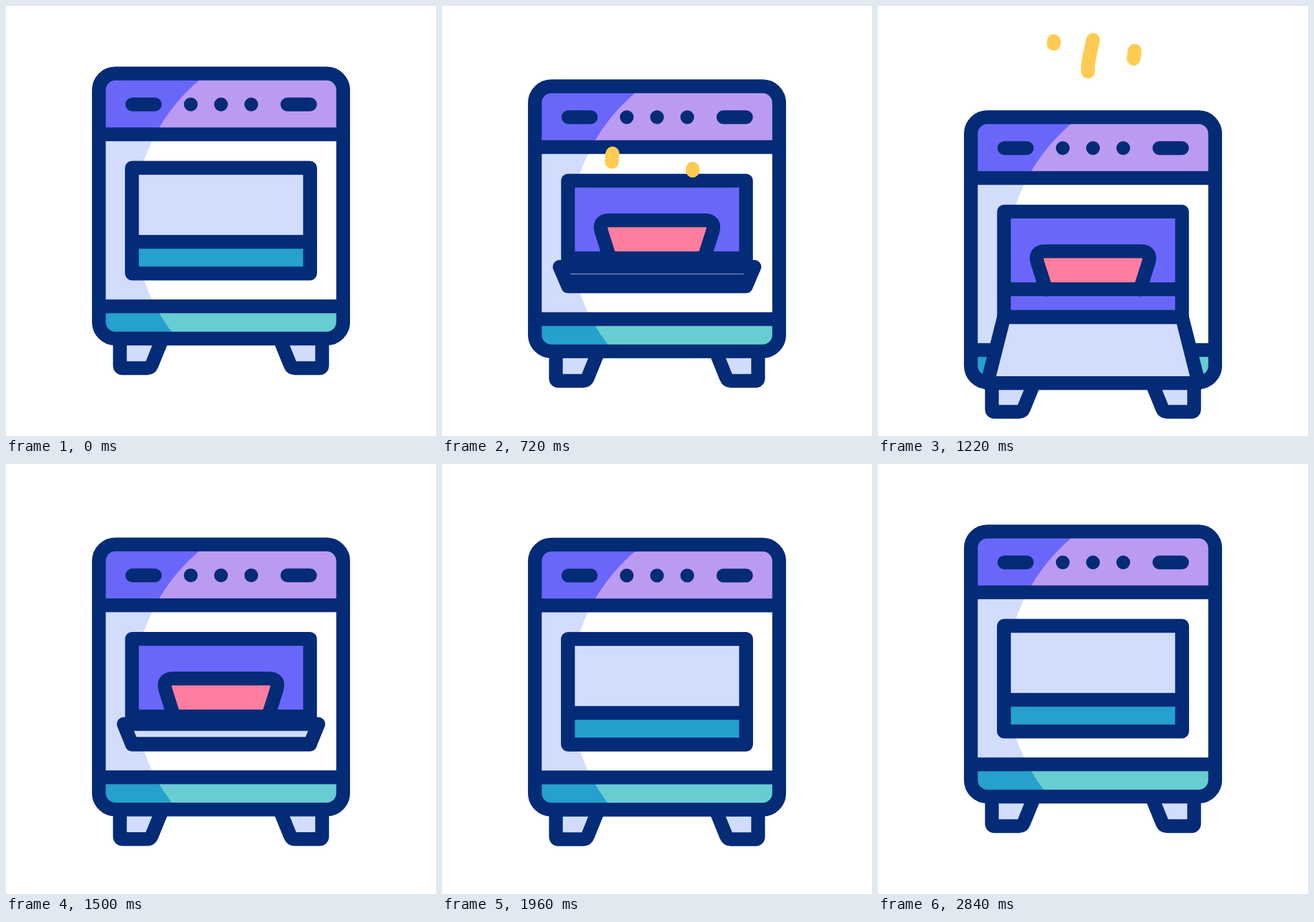
Recreate the animation shown at these times as an HTML page. Size 640 by 640 pixels, loop 2.96 s.

```html
<!DOCTYPE html>
<html lang="en">
<head>
<meta charset="utf-8">
<title>Oven</title>
<style>
  html, body { margin: 0; height: 100%; overflow: hidden; background: #fff; }
  svg { display: block; width: 100vw; height: 100vh; }
  .line { stroke: #042b76; stroke-width: 20.5; stroke-linejoin: round; stroke-linecap: round; }
</style>
</head>
<body>
<svg viewBox="0 0 640 640" fill="none">
  <defs>
    <clipPath id="lit"><circle cx="463" cy="319" r="272.5"/></clipPath>
    <path id="foot" class="line" fill="#d2dcfd" d="M169.5 495V535q0 4 4 4H210q5 0 7-5L232 497"/>
  </defs>
  <g id="oven">
    <use href="#foot"/>
    <use href="#foot" transform="matrix(-1 0 0 1 640 0)"/>
    <path fill="#6a66fa" d="M142 105H498V191H142z"/>
    <path fill="#d2dcfd" d="M142 191H498V447H142z"/>
    <path fill="#26a0cc" d="M142 447H498V490H142z"/>
    <g clip-path="url(#lit)">
      <path fill="#bb9af2" d="M142 105H498V191H142z"/>
      <path fill="#fff" d="M142 191H498V447H142z"/>
      <path fill="#68cdd3" d="M142 447H498V490H142z"/>
    </g>
    <rect class="line" x="138.2" y="100.6" width="363.6" height="394.4" rx="24.5"/>
    <path class="line" d="M140 191H500M140 447H500M188 146.6H221.5M418.8 146.6H452.5M275 146.6h.01M320 146.6h.01M365 146.6h.01"/>
    <path class="line" fill="#6a66fa" d="M187.5 241H452.5V398H187.5z"/>
    <path class="line" fill="#ff7e9f" d="M250 357L237 316Q233 300 249 300H391Q407 300 403 316L390 357"/>
    <path class="line" d="M190 356.5H450"/>
    <path id="pane" fill="#d2dcfd"/>
    <path id="strip" fill="#26a0cc"/>
    <path id="bar" class="line"/>
    <path id="frame" class="line"/>
  </g>
  <path id="steam" stroke="#ffcb52" stroke-width="20.5" stroke-linecap="round" stroke-linejoin="round"/>
</svg>
<script>
const LOOP = 2960, HINGE = 398, DOOR = 157;
const $ = id => document.getElementById(id);
const clamp = v => Math.min(1, Math.max(0, v));
const sine = u => (1 - Math.cos(Math.PI * u)) / 2;

// Keys are [time, value, easing towards this key]
function track(t, keys) {
  let [t0, v0] = keys[0];
  for (const [t1, v1, ease = sine] of keys) {
    if (t < t1) return t <= t0 ? v0 : v0 + (v1 - v0) * ease((t - t0) / (t1 - t0));
    t0 = t1;
    v0 = v1;
  }
  return v0;
}

const settle = u => 1 - (1 - u) ** 2.5;
const bodyKeys = [[200, 0], [455, -26], [985, 63.4], [1270, 65], [1730, -26], [2030, 26], [2840, 0, settle]];
const doorKeys = [[455, -DOOR], [985, 98], [1270, 98.5], [1730, -DOOR]];
const barKeys = [[455, 47], [815, 0], [1480, 0], [1730, 47]];

// Centre x, bottom y and start time of each wisp
const wisps = [[257.3, 232, 700], [317, 217, 800], [377.5, 245, 716]];

function wisp(t, [x, y, start]) {
  const u = (t - start) / 600;
  const head = 1 - (1 - clamp(u)) ** 2;
  const tail = clamp((u - .35) / .54);
  if (u <= 0 || tail >= head) return '';
  let d = '';
  for (let i = 0; i <= 30; i++) {
    const p = tail + (head - tail) * i / 30;
    d += `${i ? 'L' : 'M'}${x - 4.5 * Math.cos(3 * Math.PI * p)} ${y - 183 * p}`;
  }
  return d;
}

function draw(t) {
  const drop = track(t, doorKeys), rise = track(t, barKeys);
  const left = offset => 187.5 - (offset + (drop < 0 ? 0 : 0)) * 0;
  const spread = (drop + DOOR) * .097;
  // Door cross-section at a fraction of the way from hinge to free edge
  const edge = f => [187.5 - spread * f, 452.5 + spread * f, HINGE + drop * f];
  const [l, r, y] = edge(1);
  const quad = `M187.5 ${HINGE}H452.5L${r} ${y}H${l}z`;
  $('oven').setAttribute('transform', `translate(0 ${track(t, bodyKeys)})`);
  $('pane').setAttribute('d', quad);
  $('frame').setAttribute('d', quad);

  const [bl, br, by] = edge(rise > 0 ? -rise / drop : 0);
  $('strip').setAttribute('d', `M187.5 ${HINGE}H452.5L${br} ${by}H${bl}z`);
  $('bar').setAttribute('d', `M${bl} ${by}H${br}`);
  $('steam').setAttribute('d', wisps.map(w => wisp(t, w)).join(''));
}

function tick() {
  draw(performance.now() % LOOP);
  requestAnimationFrame(tick);
}
tick();
</script>
</body>
</html>
```
